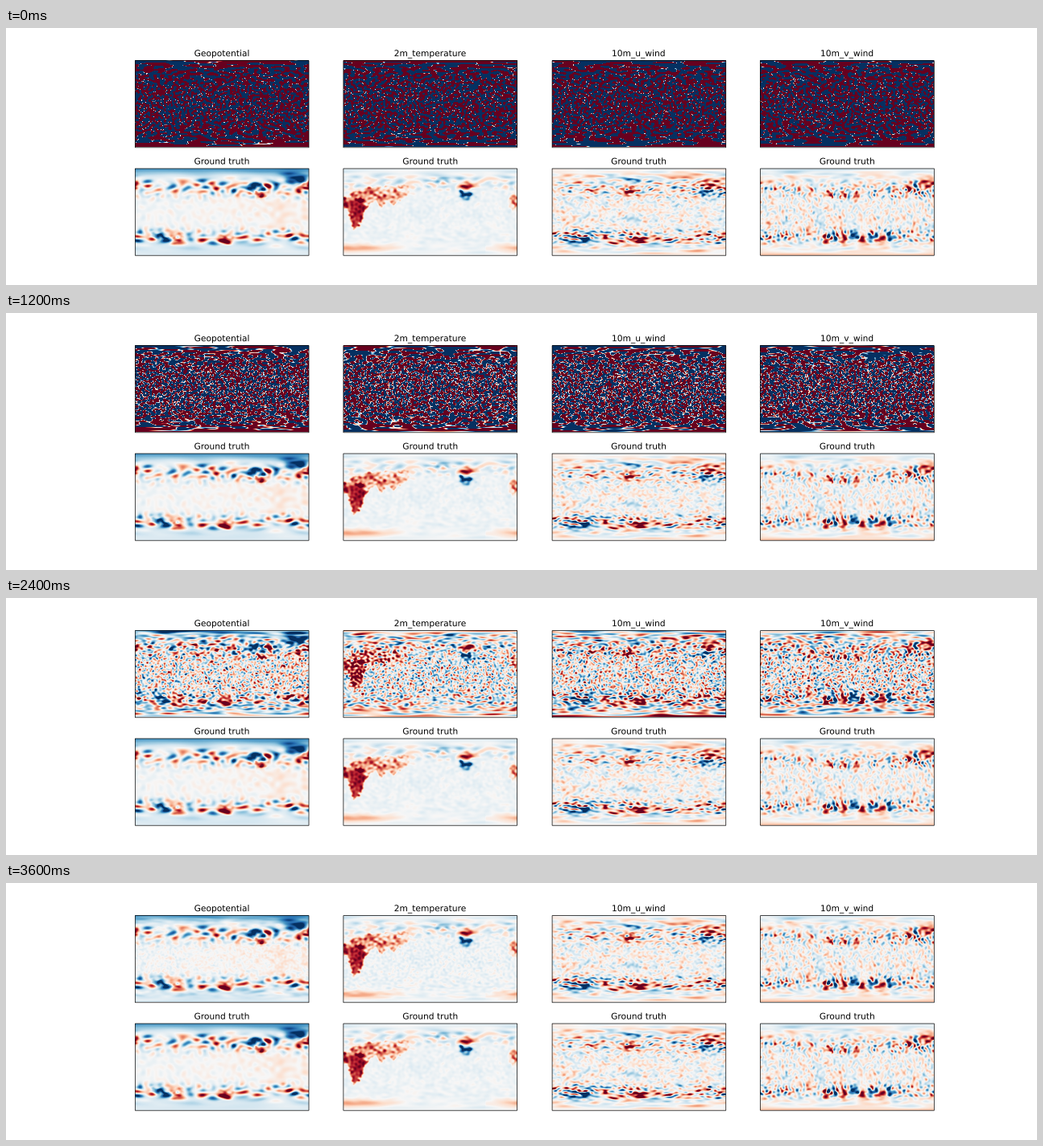
Animation, 1280 px wide and 320 px high, one loop 8 s. Source, as a matplotlib script:

```python
import numpy as np
import matplotlib.pyplot as plt
from matplotlib.animation import FuncAnimation
from matplotlib.patches import PathPatch, Rectangle
from matplotlib.path import Path
from matplotlib.textpath import TextPath
from matplotlib.transforms import Affine2D

STAGE_W, STAGE_H = 1280, 320
UNIT = 0.64              # layout grid in stage pixels
W, H = 240, 120          # map cells
PW, PH = 216, 108        # map units used for positions
LMAX = 58
STEPS, FRAMES, INTERVAL = 19, 40, 200
LIMIT = 3.0              # colour range in standard deviations

rng = np.random.default_rng(12)
X, Y = np.meshgrid((np.arange(W) + 0.5) * PW / W, (np.arange(H) + 0.5) * PH / H)


def legendre_basis():
    """Normalised Legendre functions, one (degree, latitude) array per order."""
    theta = (np.arange(H) + 0.5) * np.pi / H
    c, s = np.cos(theta), np.sin(theta)
    top, basis = np.ones(H), []
    for m in range(LMAX + 1):
        rows = [top, np.sqrt(2 * m + 3) * c * top]
        for l in range(m + 2, LMAX + 1):
            a = np.sqrt((4 * l * l - 1) / (l * l - m * m))
            b = np.sqrt(((l - 1) ** 2 - m * m) / (4 * (l - 1) ** 2 - 1))
            rows.append(a * (c * rows[-1] - b * rows[-2]))
        basis.append(np.array(rows[:LMAX + 1 - m]))
        top = np.sqrt((2 * m + 3) / (2 * m + 2)) * s * top
    return basis


BASIS = legendre_basis()


def sphere_noise(lo=0, hi=LMAX, slope=0.0):
    """Isotropic unit-variance noise on the sphere between two degrees."""
    deg = np.arange(LMAX + 1)
    weight = np.where((deg >= lo) & (deg <= hi), (deg + 1.0) ** -slope, 0)
    weight /= np.sqrt(np.sum((2 * deg + 1) * weight ** 2))
    spec = np.zeros((H, W // 2 + 1), complex)
    for m, p in enumerate(BASIS):
        a, b = rng.standard_normal((2, len(p)))
        coef = a if m == 0 else (a - 1j * b) / np.sqrt(2)
        spec[:, m] = (weight[m:] * coef) @ p
    return np.fft.irfft(spec, W, axis=1) * W


def bell(v, centre, width):
    return np.exp(-((v - centre) / width) ** 2)


def spot(x, y, rx, ry, warp=1.5):
    """Soft, slightly bent spot that wraps around the map edge."""
    dx = (X + warp * sphere_noise(8, 34) - x + PW / 2) % PW - PW / 2
    dy = Y + warp * sphere_noise(8, 34) - y
    return np.exp(-((dx / rx) ** 2 + (dy / ry) ** 2) ** 1.25)


def area(points):
    """Soft-edged mask of a polygon with a ragged outline."""
    px, py = (v + 0.9 * sphere_noise(20, 50) for v in (X, Y))
    inside = Path(points).contains_points(np.c_[px.ravel(), py.ravel()])
    mask = inside.reshape(H, W).astype(float)
    return sum(np.roll(mask, (i, j), (0, 1))
               for i in (-1, 0, 1) for j in (-1, 0, 1)) / 9


def storms(noise):
    """Noise gathered into the two storm belts, strongest in the north-east."""
    north = bell(Y, 24, 11) * (0.45 + 0.55 * X / PW)
    south = bell(Y, 86, 9)
    return (north + south) * np.sign(noise) * np.abs(noise) ** 1.35


def flow(axis):
    """Wind component: slope of a random stream function along one axis."""
    stream = sphere_noise(6, 50, 1.0)
    wind = np.gradient(stream, axis=axis)
    return wind / wind.std()


def geopotential():
    base = -0.55 * bell(Y, 0, 8) - 0.14 * bell(Y, 100, 9) - 0.03
    base += 0.09 * bell(Y, 52, 26) * X / PW + 0.1 * bell(X, 182, 10) * bell(Y, 62, 18)
    base += 0.035 * sphere_noise(3, 24) + 0.48 * storms(sphere_noise(10, 26))
    base -= 0.95 * spot(196, 11, 19, 7) + 1.2 * spot(151, 23, 10, 5)
    base += 0.9 * spot(155, 32, 7, 4) + 0.9 * spot(211, 24, 7, 5) + 0.8 * spot(1, 19, 5, 5)
    base -= 0.9 * spot(30, 85, 11, 4)
    return base + 0.9 * spot(52, 88, 6, 4) + 0.9 * spot(113, 89, 7, 5)


def temperature():
    africa = [(-2, 36), (22, 37), (26, 46), (31, 46), (24, 55), (25, 61),
              (16, 74), (11, 74), (7, 58), (5, 50), (-2, 49)]
    asia = [(4, 32), (30, 24), (82, 21), (80, 31), (62, 45), (56, 39),
            (47, 49), (40, 39), (32, 45), (24, 43)]
    grain = sphere_noise(8, 50, 0.7)
    base = -0.045 + 0.03 * sphere_noise(3, 45, 0.7)
    base += 0.13 * bell(Y, 16, 12) * sphere_noise(8, 34)
    base += 0.42 * bell(Y, 99, 5) * bell((X + 40) % PW, 55, 42)
    base += area(africa) * (0.84 + 0.1 * grain - 0.25 * bell(Y, 36, 5))
    base += area(asia) * np.clip(0.5 + 0.2 * grain - 0.004 * (X - 30), 0, 1)
    base += 0.8 * spot(212, 42, 5, 8) + 1.0 * spot(154, 22, 9, 4)
    return base - 1.2 * spot(152, 33, 8, 5) - 0.6 * spot(122, 15, 7, 4)


def wind_u():
    base = 0.1 * sphere_noise(4, 45, 0.8) + 0.07 * flow(0) + 0.42 * storms(flow(0))
    base += 0.25 * bell(Y, 8, 4) * (1 + np.sin(X / 22 + 0.6)) / 2
    base += 1.1 * spot(97, 28, 10, 4) - 0.8 * spot(101, 14, 9, 3.5)
    base += 0.95 * spot(194, 19, 12, 4) - 1.1 * spot(189, 30, 9, 4)
    return base - 1.1 * spot(40, 87, 17, 4) + 1.0 * spot(107, 89, 15, 4)


def wind_v():
    base = 0.1 * sphere_noise(5, 45, 0.8) + 0.07 * flow(1) + 0.42 * storms(flow(1))
    for x, sign in zip(range(87, 125, 8), (1, -1, 1, -1, 1)):
        base += 0.75 * sign * spot(x, 33, 3.2, 6)
    for x in range(82, 152, 23):
        base += 0.9 * spot(x, 88, 5, 6) - 0.9 * spot(x + 12, 85, 5, 6)
    base += 0.95 * spot(186, 25, 4, 6) + 1.0 * spot(208, 17, 8, 5)
    return base - 0.7 * spot(192, 20, 4, 5)


def noise_level(step):
    high, low = 80 ** (1 / 7), 0.03 ** (1 / 7)
    return (high + (step + 1) / STEPS * (low - high)) ** 7


def sample_path(truth):
    """Noisy states from pure noise down to a nearly clean map."""
    noise, states = sphere_noise(), []
    residue = 0.035 * sphere_noise(20)
    for step in range(STEPS):
        sigma = noise_level(step)
        if step and sigma > 0.75:
            noise = 0.889 * noise + 0.458 * sphere_noise()
        states.append(truth + residue + sigma / LIMIT * noise)
    return states


def snap(v):
    """Centre of the layout grid cell whose edge is nearest."""
    return (np.floor(v / UNIT + 0.5) + 0.5) * UNIT


fig = plt.figure(figsize=(STAGE_W / 64, STAGE_H / 64), dpi=64)
stage = fig.add_axes((0, 0, 1, 1))
stage.axis("off")

# Four columns and two rows with gaps of a fifth of a panel.
LEFT, TOP = 0.125 * STAGE_W, 0.12 * STAGE_H
PANEL_W = 0.775 * STAGE_W / 4.6
CELL_H = 0.77 * STAGE_H / 2.2
PANEL_H = PANEL_W / 2


def panel(col, row, data, title):
    """Map with a thin frame and a centred title; returns the image."""
    x0 = LEFT + 1.2 * PANEL_W * col
    y0 = TOP + 1.2 * CELL_H * row + (CELL_H - PANEL_H) / 2
    x1, y1 = x0 + PANEL_W, y0 + PANEL_H
    image = stage.imshow(data, cmap="RdBu_r", vmin=-1, vmax=1, aspect="auto",
                         extent=(x0, x1, y1, y0))
    fx, fy = snap(x0), snap(y0)
    stage.add_patch(Rectangle((fx, fy), snap(x1) - fx, snap(y1) - fy, fill=False,
                              ec="black", lw=0.8, snap=False, zorder=3))
    text = TextPath((0, 0), title, size=12 * 64 / 72)
    box = text.get_extents()
    place = Affine2D().scale(1, -1).translate(
        (x0 + x1) / 2 - (box.x0 + box.x1) / 2, y0 - 6 * 64 / 72)
    stage.add_patch(PathPatch(place.transform_path(text), fc="black", lw=0, snap=False))
    return image


FIELDS = [("Geopotential", geopotential), ("2m_temperature", temperature),
          ("10m_u_wind", wind_u), ("10m_v_wind", wind_v)]

plt.rcParams["font.family"] = "DejaVu Sans"
paths, images = [], []
for col, (name, build) in enumerate(FIELDS):
    truth = build()
    paths.append(sample_path(truth))
    images.append(panel(col, 0, paths[-1][0], name))
    panel(col, 1, truth, "Ground truth")
stage.set(xlim=(0, STAGE_W), ylim=(STAGE_H, 0))


def update(frame):
    step = min(frame, STEPS - 1)
    for image, states in zip(images, paths):
        image.set_data(states[step])
    return images


anim = FuncAnimation(fig, update, frames=FRAMES, interval=INTERVAL,
                     repeat=True, repeat_delay=0, blit=False)
plt.show()
```
